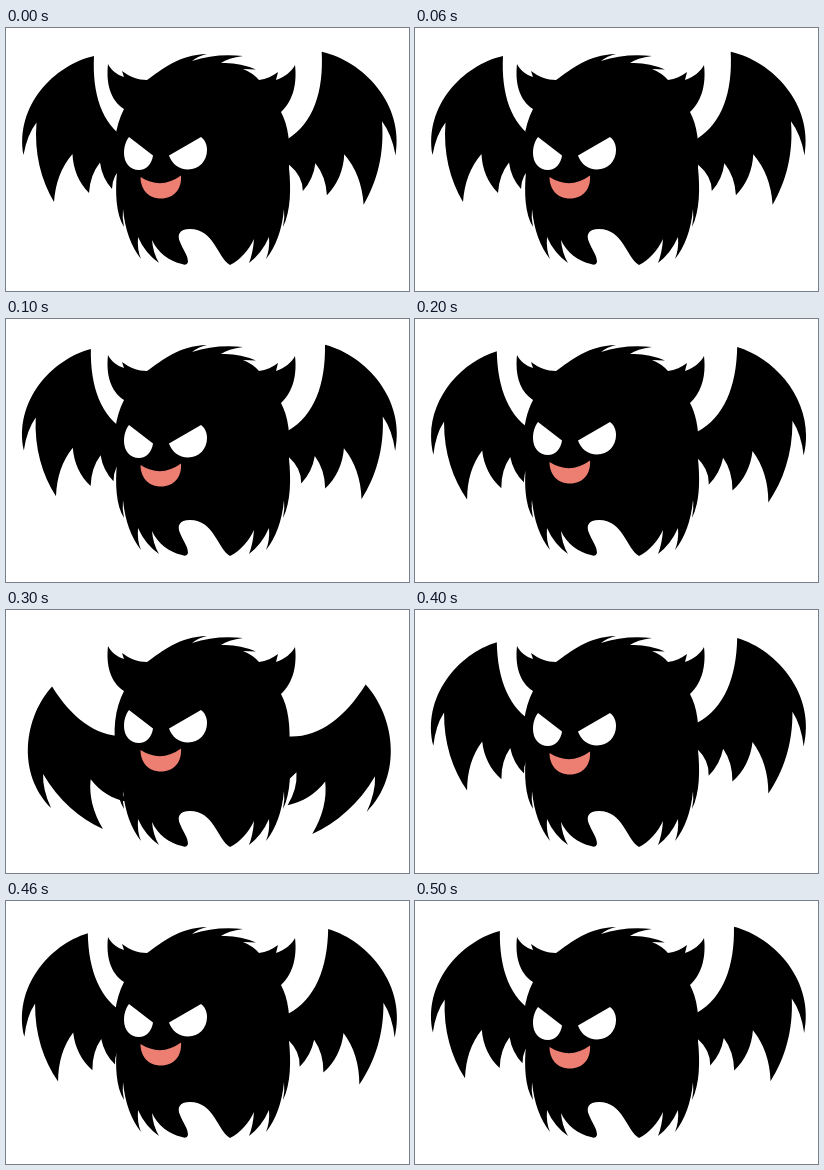
An HTML page for the animation above (0.6 s loop, 403 by 263 pixels).

```html
<!DOCTYPE html>
<html lang="en">
<head>
<meta charset="utf-8">
<title>Flapping monster</title>
<style>
  html, body { margin: 0; width: 100%; height: 100%; overflow: hidden; background: #fff; }
  svg { display: block; width: 403px; height: 263px; }
</style>
</head>
<body>
<svg viewBox="0 0 403 263">
  <defs>
    <path id="wing" transform="translate(-144 -118.8)" d="
      M88 28 C48 37 9 78 17.5 127
      Q21 107 30.5 94.5 C28 125 35 152 48 174
      Q50 145 66.5 126 C67 141 73 155 83 165
      Q84 147 94 134.5 Q96 150 106 161
      Q106 147 119 136 L144 128 L144 111 L120 111
      C96 96 86 66 88 28Z"/>
  </defs>
  <use id="left" href="#wing"/>
  <use id="right" href="#wing"/>
  <path d="
    M102 36 C105 42 111 47 118 49 L116 43 C124 49 132 52 141 52
    C157 41 172 27 201 26 Q192 28 186 33
    Q210 25 237 28 Q222 30 215 35
    Q233 34 250 41.5 Q244 41 237 41
    Q247 45 253 52 C260 51 267 48 272 44 L270 52
    C279 49 286 43 289 37 C291 54 288 72 275 84
    C282 97 285 116 283 140 C285 160 285 183 277 199
    Q279 190 278 181 Q275 212 260 231
    Q264 221 263 209 Q256 225 243 235
    Q247 225 248 211 C243 222 234 232 224 237
    C211 229 208 201 184 201 C173 201 171 207 174 214
    C177 222 182 227 182 234 Q181 238 176 236
    C163 233 152 225 146 212 Q147 225 153 235
    Q139 225 132 209 Q131 222 135 231
    Q120 212 117 181 Q116 190 118 199
    C110 186 109 165 111 144 C106 122 109 98 118 81
    C104 72 100 55 102 36Z"/>
  <g id="face">
    <path fill="#fff" d="M123 109 L147 127.5 C146 136 140 142 133 142 C124 142 118 135 118 125 C118 118 120 113 123 109Z"/>
    <path fill="#fff" d="M163 127.5 L195 109 C199 112 201 117 201 122 C201 133 193 141.5 182 141.5 C173 141.5 166 136 163 127.5Z"/>
    <path fill="#ec7e72" d="M134.5 149 Q155 162 175 147.5 C176 161 168 170.5 155 170.5 C143 170.5 134.5 162 134.5 149Z"/>
  </g>
</svg>
<script>
  const HOLD = 100;
  const DROP = [0, 2, 4, 35]; // wing angle per pose, in degrees
  const [left, right, face] = ["left", "right", "face"].map(id => document.getElementById(id));

  function draw(time) {
    const step = Math.floor(time / HOLD) % 6;
    const pose = 3 - Math.abs(3 - step); // 0 1 2 3 2 1
    const turn = `rotate(${-DROP[pose]})`;
    left.setAttribute("transform", `translate(144 118.8) ${turn}`);
    right.setAttribute("transform", `translate(257 118.8) scale(-1.048 1.048) ${turn}`);
    face.setAttribute("transform", `translate(0 ${-3 * pose})`);
  }

  const start = performance.now();
  function tick() {
    draw(performance.now() - start);
    requestAnimationFrame(tick);
  }
  tick();
</script>
</body>
</html>
```
